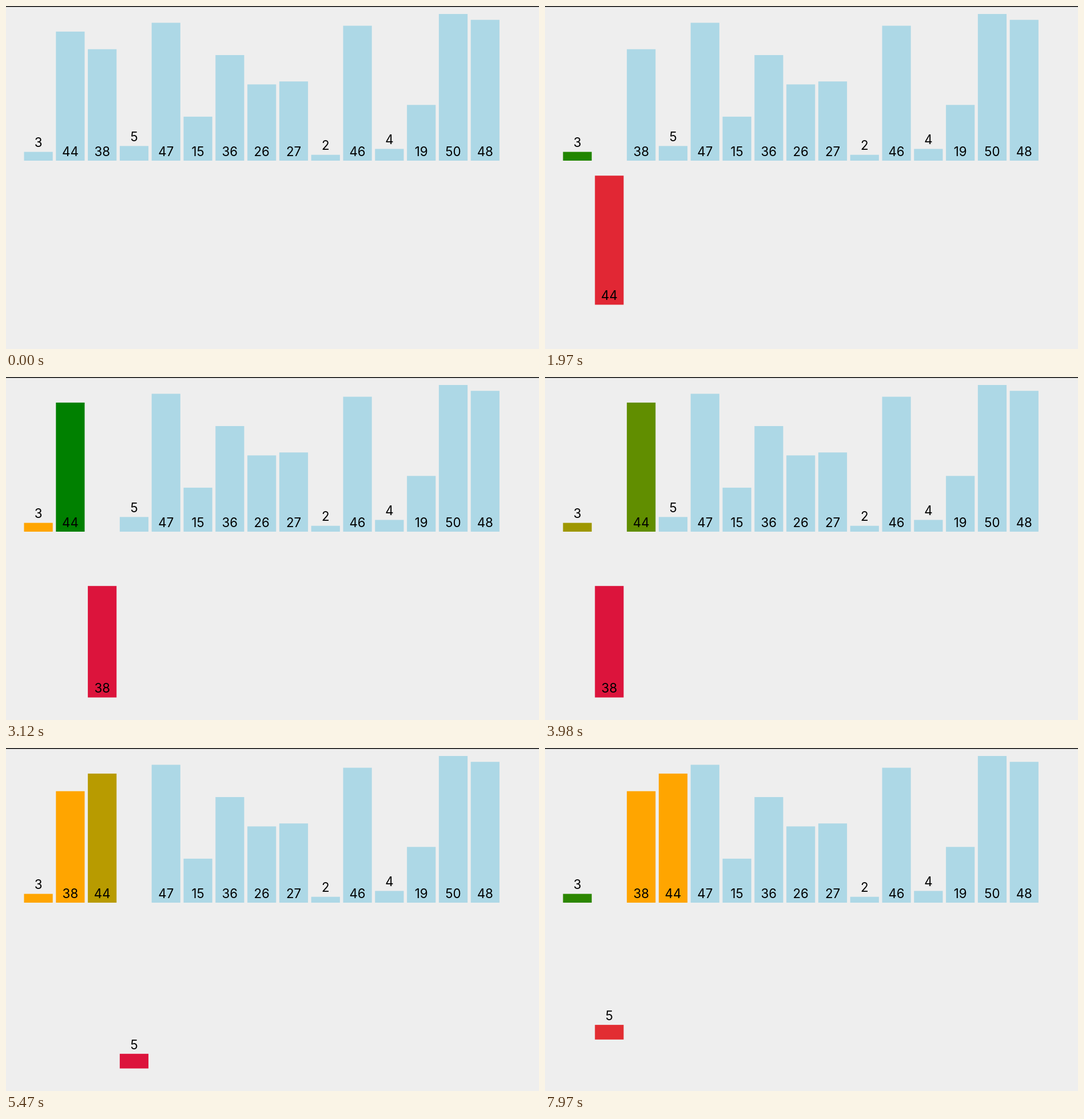
Animation, 932 px wide and 601 px high, one loop 8 s. Source, as an HTML page:

```html
<!DOCTYPE html>
<html lang="en">
<head>
<meta charset="utf-8">
<title>Insertion sort</title>
<style>
html, body { margin: 0; width: 100%; height: 100%; overflow: hidden; background: #eee; }
svg { display: block; width: 932px; height: 601px; }
text { font: 22.3px Inter, sans-serif; text-anchor: middle; }
</style>
</head>
<body>
<svg viewBox="0 0 932 601">
  <rect width="932" height="601" fill="#eee"/>
  <rect width="932" height="1.5"/>
  <g id="bars"></g>
</svg>
<script>
const LOOP = 8000, TICK = 80, TWEEN = 250;
const LEFT = 31.5, PITCH = 55.8, WIDTH = 50.2, UNIT = 5.14;
const BASE = 271, DROP = 290.5, LABEL_GAP = 8.3;

const BLUE = [173, 216, 230], ORANGE = [255, 165, 0];
const GREEN = [0, 128, 0], CRIMSON = [220, 20, 60];

const values = [3, 44, 38, 5, 47, 15, 36, 26, 27, 2, 46, 4, 19, 50, 48];

const sorted = { fill: ORANGE };
const compared = { fill: GREEN };
const picked = { fill: CRIMSON, low: 1 };
const placed = { fill: ORANGE, low: 0 };
const to = slot => ({ slot });

// [first tick, last tick, tween time already elapsed at first tick, changes by value]
const steps = [
  [500, 660, 105, { 3: sorted }],
  [960, 1190, 68, { 44: picked }],
  [1510, 1590, 130, { 3: compared }],
  [1970, 2200, 80, { 3: sorted, 44: placed }],
  [2430, 2670, 52, { 38: picked }],
  [2970, 3120, 96, { 44: compared }],
  [3440, 3670, 70, { 44: to(2), 38: to(1) }],
  [3900, 4130, 34, { 44: sorted, 3: compared }],
  [4450, 4690, 75, { 3: sorted, 38: placed }],
  [4920, 5160, 54, { 5: picked }],
  [5470, 5620, 103, { 44: compared }],
  [5950, 6170, 75, { 44: to(3), 5: to(2) }],
  [6400, 6640, 25, { 44: sorted, 38: compared }],
  [6950, 7190, 72, { 38: to(2), 5: to(1) }],
  [7410, 7660, 35, { 38: sorted, 3: compared }],
  [7880, 7970, 8, { 3: sorted, 5: placed }]
];

const mix = (a, b, f) => a + (b - a) * f;
const easeInOut = t => t < 0.5 ? 4 * t ** 3 : 1 - (2 - 2 * t) ** 3 / 2;

// Motion advances in held ticks.
function progress(now, [first, last, lead]) {
  const count = Math.round((last - first) / TICK);
  const tick = now >= last ? count : Math.min(count - 1, Math.floor((now - first) / TICK));
  return easeInOut(Math.min(1, (lead + tick * TICK) / TWEEN));
}

function blend(bar, change, f) {
  for (const key in change) {
    const end = change[key];
    bar[key] = key === "fill" ? bar.fill.map((c, i) => mix(c, end[i], f)) : mix(bar[key], end, f);
  }
}

function stateAt(now) {
  const bars = values.map((value, slot) => ({ value, slot, low: 0, fill: BLUE }));
  const active = steps.filter(step => step[0] <= now);
  active.forEach((step, i) => {
    const f = i < active.length - 1 ? 1 : progress(now, step);
    for (const bar of bars) blend(bar, step[3][bar.value], f);
  });
  return bars;
}

function add(tag, parent) {
  return parent.appendChild(document.createElementNS("http://www.w3.org/2000/svg", tag));
}

const group = document.getElementById("bars");
const nodes = values.map(value => {
  const rect = add("rect", group), label = add("text", group);
  rect.setAttribute("width", WIDTH);
  rect.setAttribute("height", value * UNIT);
  label.textContent = value;
  return { rect, label };
});

function draw(now) {
  stateAt(now).forEach((bar, i) => {
    const { rect, label } = nodes[i];
    const x = LEFT + bar.slot * PITCH;
    const bottom = BASE + bar.low * DROP;
    const top = bottom - bar.value * UNIT;
    rect.setAttribute("x", x);
    rect.setAttribute("y", top);
    rect.setAttribute("fill", `rgb(${bar.fill.map(Math.round)})`);
    label.setAttribute("x", x + WIDTH / 2);
    label.setAttribute("y", (bar.value < 10 ? top : bottom) - LABEL_GAP);
  });
}

const start = performance.now();
function frame() {
  draw((performance.now() - start) % LOOP);
  requestAnimationFrame(frame);
}
frame();
</script>
</body>
</html>
```
